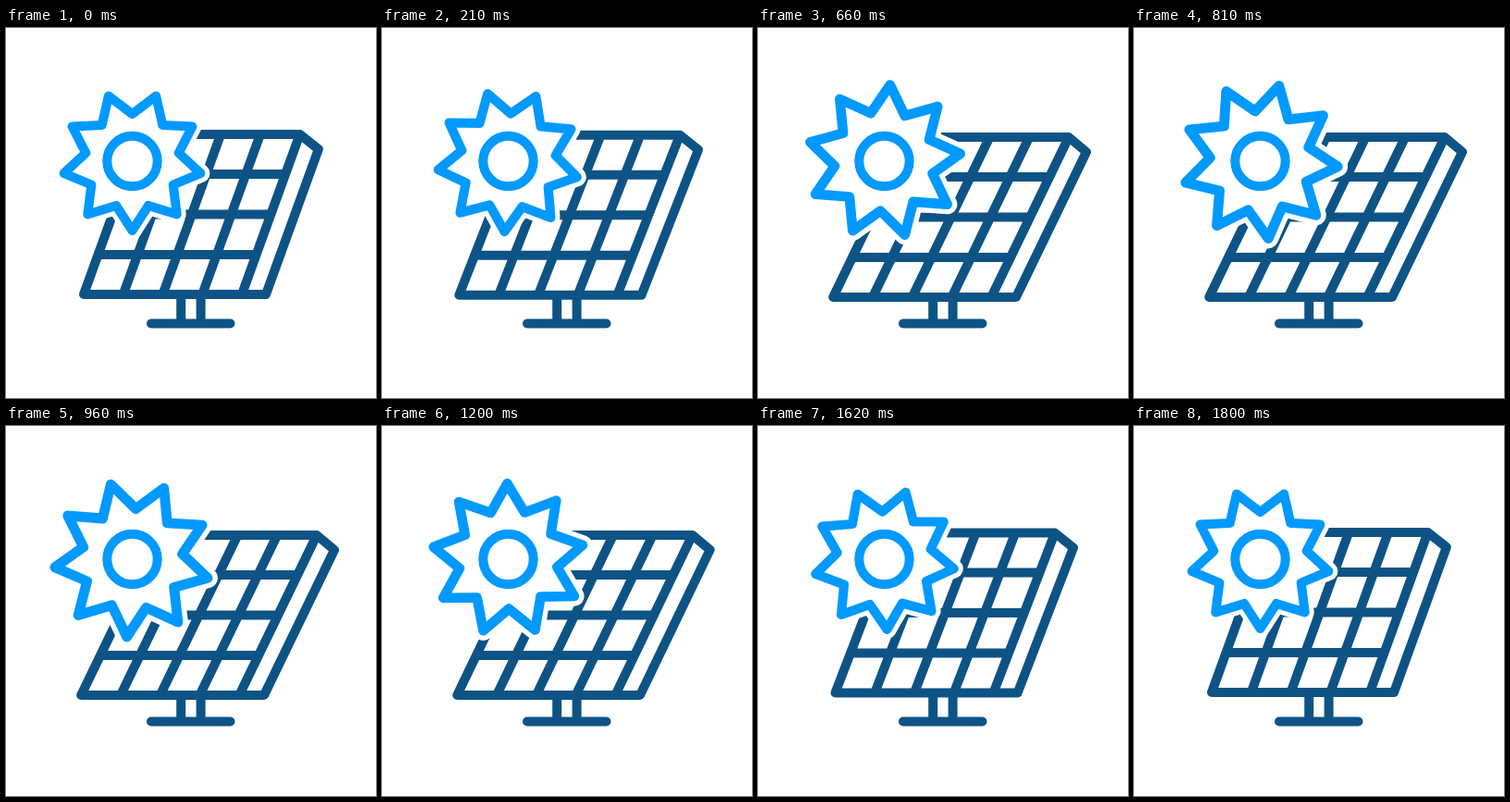
An HTML page for the animation above (3860 ms loop, 400x400 px).

```html
<!DOCTYPE html>
<html lang="en">
<head>
<meta charset="utf-8">
<title>Solar panel</title>
<style>
  html, body { margin: 0; width: 100%; height: 100%; overflow: hidden; background: #fff; }
  svg { display: block; width: 100%; height: 100%; }
  path, circle { fill: none; stroke-width: 10; stroke-linejoin: round; }
  .dark { stroke: #0e5385; }
  .light { stroke: #09f; }
  .cap { stroke-linecap: round; }
  #halo { fill: #fff; stroke: #fff; }
</style>
</head>
<body>
<svg viewBox="0 0 400 400">
  <path class="dark" d="M189.2 290V319M210.6 290V319"/>
  <path class="dark cap" d="M157 319.5H242.5"/>
  <path class="dark" id="panel"/>
  <path id="halo"/>
  <path class="light" id="star"/>
  <circle class="light" cx="136.5" cy="144" r="27.2"/>
</svg>
<script>
const LOOP = 3860, MOVE = 1800, STEP = 30;
const SUN = { x: 136.5, y: 144, points: 9 };
const [panel, halo, star] = ['panel', 'halo', 'star'].map(id => document.getElementById(id));

const clamp = v => Math.min(1, Math.max(0, v));
const ease = v => { v = clamp(v); return v * v * (3 - 2 * v); };
const mix = (a, b, k) => a + (b - a) * k;
const pt = (x, y) => x.toFixed(2) + ' ' + y.toFixed(2);

function panelPath(k) {
  const left = mix(84, 81.2, k), bottom = mix(288, 291, k), skew = mix(0.362, 0.484, k);
  const at = (x, h) => pt(left + x + h * skew, bottom - h);
  const W = 171, H = 173, COL = W / 4, ROW = 43.5, SIDE = 157;
  const depth = mix(281, 279, k) - left;
  let d = `M${at(0, 0)}L${at(0, H)}L${at(W, H)}L${at(depth, SIDE)}L${at(depth, 0)}Z`;
  for (let i = 1; i < 5; i++) d += `M${at(COL * i, 0)}L${at(COL * i, H)}`;
  for (let i = -1; i < 2; i++) d += `M${at(0, H / 2 + ROW * i)}L${at(W, H / 2 + ROW * i)}`;
  return d;
}

function starPath(turn, k) {
  const radii = [mix(75, 84.2, k), mix(51, 54.5, k)];
  const pts = [];
  for (let i = 0; i < SUN.points * 2; i++) {
    const a = (10 + turn + i * 180 / SUN.points) * Math.PI / 180, r = radii[i % 2];
    pts.push(pt(SUN.x + r * Math.cos(a), SUN.y + r * Math.sin(a)));
  }
  return 'M' + pts.join('L') + 'Z';
}

function draw(ms) {
  const u = clamp(Math.floor(ms % LOOP / STEP) * STEP / MOVE);
  const edge = Math.min(u, 1 - u);
  panel.setAttribute('d', panelPath(ease(edge * 60 / 22)));
  const grow = ease(edge * 2), d = starPath(80 * ease(u), grow), line = mix(10, 10.9, grow);
  star.setAttribute('d', d);
  star.style.strokeWidth = line;
  halo.setAttribute('d', d);
  halo.style.strokeWidth = line * 2;
}

const start = performance.now();
function tick() {
  draw(performance.now() - start);
  requestAnimationFrame(tick);
}
tick();
</script>
</body>
</html>
```
